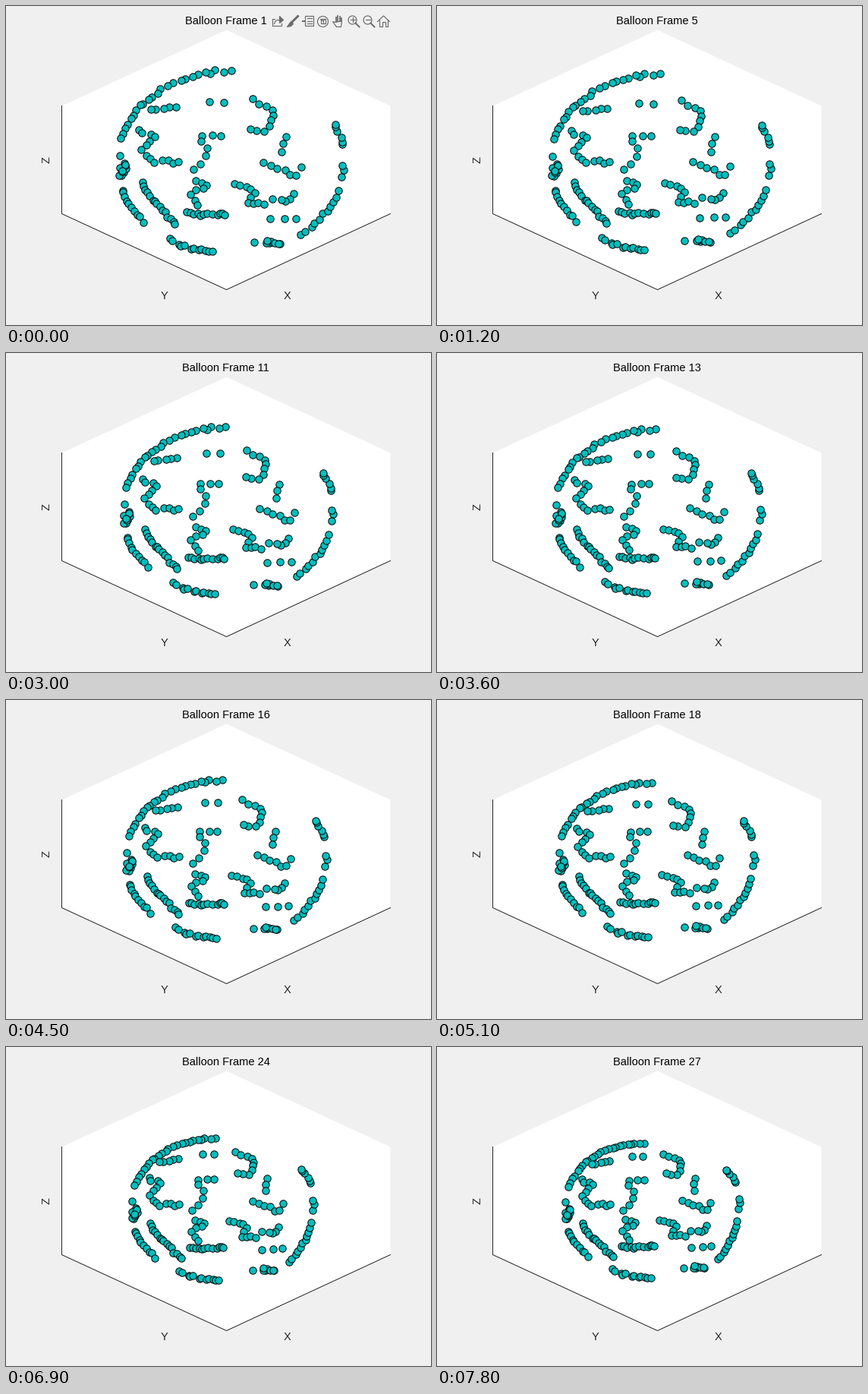
Animation, 560 px wide and 420 px high, one loop 8000 ms. Source, as a matplotlib script:

```python
import numpy as np
import matplotlib.pyplot as plt
from matplotlib.animation import FuncAnimation
from matplotlib.patches import Circle, Polygon, Rectangle

W, H, DPI = 560, 420, 100
PX = 72 / DPI            # one pixel in points
INK, GREY, TEAL = "#262626", "#6e6e6e", "#00bfbf"
STEPS = 27               # one step lasts 300 ms, the last one 200 ms

plt.rcParams["font.family"] = "Liberation Sans"
rng = np.random.default_rng(4)
fig = plt.figure(figsize=(W / DPI, H / DPI), dpi=DPI, facecolor="#f0f0f0")
ax = fig.add_axes([0, 0, 1, 1])
ax.set(xlim=(-0.5, W - 0.5), ylim=(H - 0.5, -0.5))
ax.axis("off")


def label(x, y, text, color=INK, **kw):
    return ax.text(x, y, text, color=color, fontsize=14.67 * PX, ha="center", **kw)


# Box of the 3-D axes
box = [(73, 273), (290, 373), (506, 273), (506, 131), (290, 31), (73, 131)]
ax.add_patch(Polygon(box, fc="white", lw=0))
ax.plot(*zip(box[5], *box[:3]), color=INK, lw=PX, solid_joinstyle="miter")
label(370.3, 385.5, "X")
label(208.3, 385.5, "Y")
label(53.5, 202, "Z", rotation=90, va="center")
title = label(289.3, 23.3, "", color="black")


def arc(first, last, count):
    """Points on the balloon's outline between two angles in degrees."""
    angle = np.radians(np.linspace(first, last, count) + rng.normal(0, 0.6, count))
    radius = rng.normal(1.012, 0.008, count)
    return np.column_stack([295 + 148 * radius * np.cos(angle),
                            205 - 119 * radius * np.sin(angle)])


def strand(count, *keys):
    """Evenly spaced, slightly scattered points along a bent line."""
    x, y = np.array(keys, float).T
    length = np.append(0, np.cumsum(np.hypot(np.diff(x), np.diff(y))))
    at = np.linspace(0, length[-1], count)
    line = np.column_stack([np.interp(at, length, x), np.interp(at, length, y)])
    return line + rng.normal(0, 1.2, (count, 2))


def clump(count, center, spread):
    return rng.normal(center, spread, (count, 2))


start = np.vstack([
    arc(90, 130, 13),
    arc(134, 164, 11),
    arc(197, 220, 10),
    arc(238, 262, 12),
    arc(308, 341, 11),
    arc(351, 358, 3),
    arc(10, 24, 6),
    clump(12, (153, 214), (4.5, 6.5)),
    clump(8, (347, 312), (7, 4)),
    strand(5, (222, 131), (190, 136)),
    strand(14, (174, 162), (196, 171), (178, 190), (192, 204), (228, 206)),
    strand(15, (179, 230), (188, 250), (203, 264), (222, 289)),
    strand(2, (266, 126), (285, 126)),
    strand(8, (282, 170), (252, 170), (264, 190), (258, 205), (244, 214)),
    strand(8, (250, 229), (264, 236), (243, 246), (253, 261)),
    strand(12, (236, 272), (254, 274), (290, 272)),
    strand(10, (325, 123), (354, 139), (342, 166), (321, 163)),
    strand(3, (369, 170), (362, 192)),
    strand(7, (338, 206), (365, 214), (379, 226), (387, 213)),
    strand(10, (301, 232), (326, 242), (319, 259), (339, 261)),
    strand(5, (379, 246), (372, 259), (351, 252)),
    strand(3, (351, 280), (381, 282)),
])


def shrink(points):
    """Displacement of each point over the whole loop."""
    u, v = (points[:, 0] - 270) / 130, (points[:, 1] - 205) / 115
    up, down = np.maximum(-v, 0), np.maximum(v, 0)
    corner = 20 * (u * up) ** 2
    dx = (-5 - 16 * u - 11 * u * abs(u) + 14.5 * down ** 2
          - up * (9 + 14 * np.tanh(2 * u)) + corner * (u < 0))
    dy = -6.5 * u - 19 * down + up * (14 + 24 * up ** 2) + corner * (u > 0)
    return np.column_stack([dx, dy])


travel = shrink(start)
dots, = ax.plot([], [], "o", ms=9.4 * PX, mfc=TEAL, mec="black", mew=PX)

# Axes toolbar, seen only during the first step
toolbar = []


def stroke(*points, lw=1.2):
    toolbar.extend(ax.plot(*zip(*points), color=GREY, lw=lw * PX))


def shape(patch, fill=False):
    patch.set(fc=GREY if fill else "none", ec=GREY, lw=1.2 * PX)
    toolbar.append(ax.add_patch(patch))


def export_icon(x):
    stroke((x - 4, 17), (x - 7, 17), (x - 7, 26), (x + 5, 26), (x + 5, 23))
    stroke((x - 4, 23), (x - 3, 20), (x, 18), (x + 5, 18))
    shape(Polygon([(x + 3, 13), (x + 8, 18), (x + 3, 22)]), fill=True)


def brush_icon(x):
    stroke((x + 7, 13), (x, 20), lw=3)
    shape(Polygon([(x - 2, 20), (x + 1, 23), (x - 2, 26), (x - 7, 27)]), fill=True)


def tip_icon(x):
    shape(Rectangle((x - 5, 13), 11, 13))
    for row in (16, 19.5, 23):
        stroke((x - 2, row), (x + 4, row))
    stroke((x - 8, 20), (x - 5, 20), lw=2)


def rotate_icon(x):
    shape(Circle((x, 20), 7))
    shape(Rectangle((x - 3, 17), 6, 6))
    stroke((x - 3, 17), (x, 19), (x + 3, 17))
    stroke((x, 19), (x, 23))


def hand_icon(x):
    for finger, tip in zip((-3, -0.5, 2, 4.5), (15, 13, 14, 16)):
        stroke((x + finger, 20), (x + finger, tip), lw=1.8)
    shape(Polygon([(x - 7, 20), (x - 3, 21), (x + 5, 19), (x + 4, 27), (x - 2, 27)]))


def zoom_icon(x, plus):
    shape(Circle((x, 18), 5.5))
    stroke((x + 4, 22), (x + 9, 27), lw=2)
    stroke((x - 3, 18), (x + 3, 18))
    if plus:
        stroke((x, 15), (x, 21))


def home_icon(x):
    stroke((x - 8, 20), (x, 12.5), (x + 8, 20))
    stroke((x - 5.5, 18), (x - 5.5, 27), (x - 2, 27), (x - 2, 21),
           (x + 2, 21), (x + 2, 27), (x + 5.5, 27), (x + 5.5, 18))


export_icon(357)
brush_icon(377)
tip_icon(398)
rotate_icon(417)
hand_icon(437)
zoom_icon(456, plus=True)
zoom_icon(476, plus=False)
home_icon(497)


def update(frame):
    step = frame // 3
    p = step / (STEPS - 1)
    dots.set_data(*(start + travel * p * (0.65 + 0.35 * p)).T)
    title.set_text(f"Balloon Frame {step + 1}")
    for part in toolbar:
        part.set_visible(step == 0)
    return dots, title, *toolbar


anim = FuncAnimation(fig, update, frames=80, interval=100, repeat=True,
                     repeat_delay=0, blit=False)
plt.show()
```
